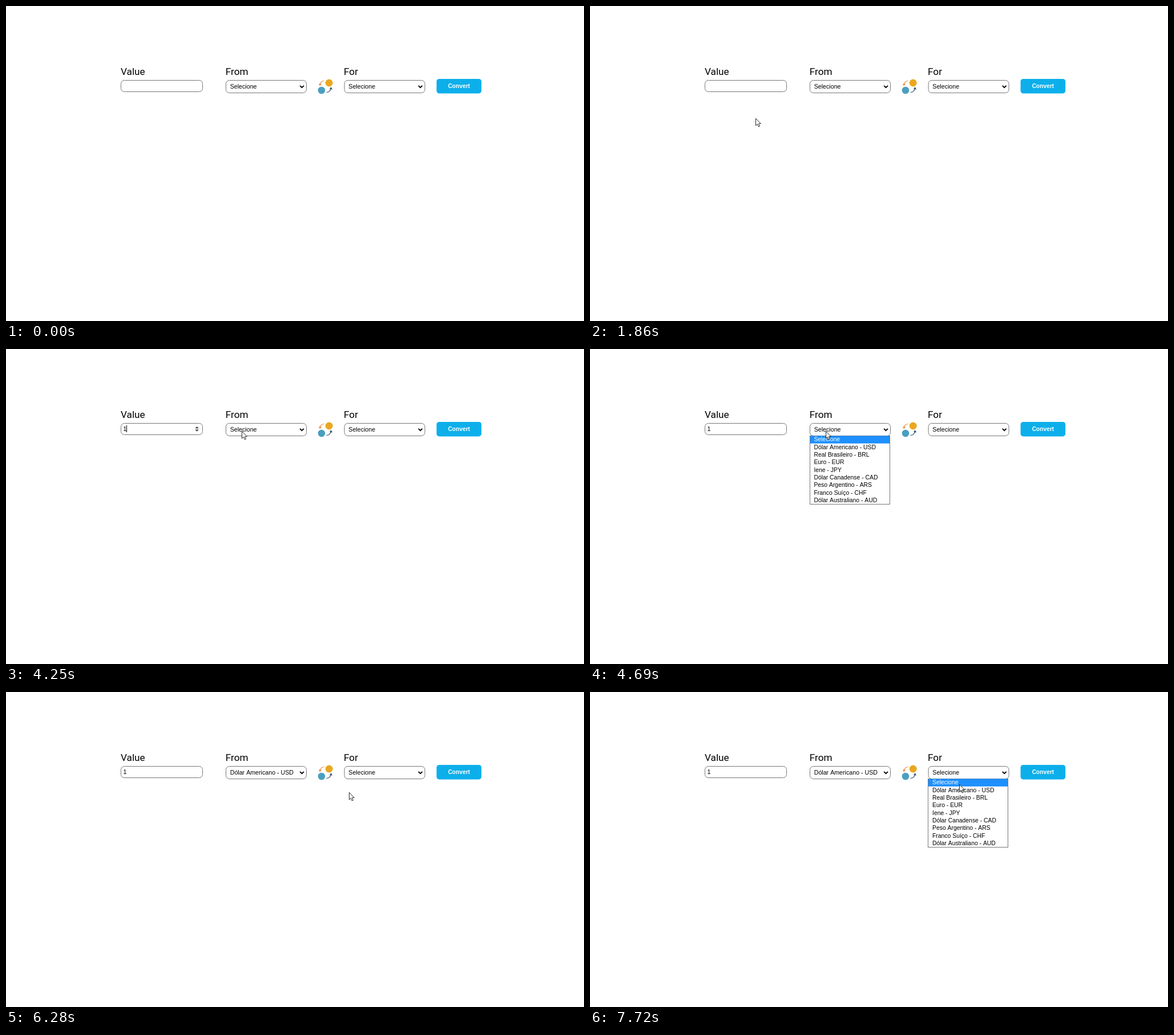
An HTML page with a canvas that plays this animation: 1013 by 553 pixels, repeating every 8 s.

```html
<!DOCTYPE html>
<html lang="en">
<head>
<meta charset="utf-8">
<title>Currency converter</title>
<style>
html, body { margin: 0; width: 100%; height: 100%; overflow: hidden; background: #fff; }
canvas { display: block; width: 1013px; height: 553px; }
</style>
</head>
<body>
<canvas id="stage"></canvas>
<script>
const W = 1013, H = 553, LOOP = 8000, TICK = 40;
const canvas = document.getElementById('stage');
const ratio = window.devicePixelRatio || 1;
canvas.width = W * ratio;
canvas.height = H * ratio;
const ctx = canvas.getContext('2d');

const ARIAL = '"Liberation Sans", Arial, sans-serif';
const LABEL = '17.2px Roboto, sans-serif';
const FIELD = `10.667px ${ARIAL}`;
const OPTION = `10.4px ${ARIAL}`;
const BUTTON = `bold 10.2px ${ARIAL}`;
const BORDER = '#767676';
const OPTIONS = [
  'Selecione', 'Dólar Americano - USD', 'Real Brasileiro - BRL',
  'Euro - EUR', 'Iene - JPY', 'Dólar Canadense - CAD',
  'Peso Argentino - ARS', 'Franco Suíço - CHF', 'Dólar Australiano - AUD'
];
const FROM_X = 385, FOR_X = 592.6;

// Pointer moves: start, last step, destination x and y
const MOVES = [
  [660, 780, 851, 474],
  [940, 1100, 620, 383],
  [1260, 1380, 452, 286],
  [1540, 1700, 291, 198],
  [1860, 2180, 236, 142],
  [3730, 3930, 362, 150],
  [4130, 4250, 413, 144],
  [5040, 5360, 418, 166],
  [5400, 5480, 417, 169],
  [5760, 5760, 417, 164],
  [5920, 5960, 417, 170],
  [6120, 6280, 601, 176],
  [6480, 6720, 654, 146],
  [6760, 6920, 645, 139],
  [7520, 7720, 647, 162]
];

const within = (t, a, b) => t >= a && t < b;
const smooth = p => p * p * (3 - 2 * p);

function pointerAt(t) {
  let x = 982, y = 533;
  for (const [start, end, toX, toY] of MOVES) {
    if (t < start) break;
    const last = Math.round((end - start) / TICK);
    const step = Math.min(last, Math.floor((t - start) / TICK));
    const p = smooth((step + 0.5) / (last + 0.5));
    x += (toX - x) * p;
    y += (toY - y) * p;
  }
  return [Math.round(x), Math.round(y)];
}

function text(str, x, y, font, color = '#000', align = 'left') {
  ctx.font = font;
  ctx.fillStyle = color;
  ctx.textAlign = align;
  ctx.fillText(str, x, y);
}

function roundBox(x, y, w, h, r, fill, stroke) {
  ctx.beginPath();
  ctx.roundRect(x, y, w, h, r);
  ctx.fillStyle = fill;
  ctx.fill();
  if (!stroke) return;
  ctx.lineWidth = 1;
  ctx.strokeStyle = stroke;
  ctx.stroke();
}

function line(points, color, width) {
  ctx.beginPath();
  points.forEach(([x, y]) => ctx.lineTo(x, y));
  ctx.strokeStyle = color;
  ctx.lineWidth = width;
  ctx.stroke();
}

function shape(points, fill) {
  ctx.beginPath();
  points.forEach(([x, y]) => ctx.lineTo(x, y));
  ctx.closePath();
  ctx.fillStyle = fill;
  ctx.fill();
}

function disc(x, y, r, color) {
  ctx.beginPath();
  ctx.arc(x, y, r, 0, Math.PI * 2);
  ctx.fillStyle = color;
  ctx.fill();
}

function curve(x0, y0, cx, cy, x1, y1, color) {
  ctx.beginPath();
  ctx.moveTo(x0, y0);
  ctx.quadraticCurveTo(cx, cy, x1, y1);
  ctx.strokeStyle = color;
  ctx.lineWidth = 1.2;
  ctx.stroke();
}

function select(x, value) {
  roundBox(x + 0.5, 130.5, 141, 22, 6, '#fff', BORDER);
  text(value, x + 7.7, 145, FIELD);
  const cx = x + 133.6;
  line([[cx - 3.4, 139.8], [cx, 143.2], [cx + 3.4, 139.8]], '#000', 1.9);
}

function swapIcon() {
  disc(566.2, 135, 6.5, '#e9a820');
  disc(553, 148, 6.3, '#4a9fc0');
  curve(557.5, 131.5, 551, 132, 550.5, 138, '#e58a3a');
  shape([[548, 136.3], [553, 136.8], [550.2, 140.6]], '#e58a3a');
  curve(561.5, 151.5, 568.5, 151, 569.3, 145, '#34506e');
  shape([[567, 146], [572, 146.4], [569.8, 142]], '#34506e');
}

function valueField(t) {
  roundBox(201.5, 130.5, 143, 20, 6, '#fff', BORDER);
  if (t >= 3340) text('1', 205.6, 144.2, FIELD);
  if (within(t, 2060, 4530)) {
    ctx.fillStyle = '#f1f1f1';
    ctx.fillRect(331, 136, 7, 9);
    shape([[331.6, 139.2], [334.6, 136], [337.6, 139.2]], '#404040');
    shape([[331.6, 141.5], [334.6, 144.7], [337.6, 141.5]], '#404040');
  }
  ctx.fillStyle = '#000';
  if (within(t, 2420, 2940)) ctx.fillRect(205, 134, 1, 12);
  if (within(t, 3340, 3730) || within(t, 4130, 4530)) ctx.fillRect(211, 134, 1, 12);
}

function dropdown(x, active, alpha) {
  ctx.globalAlpha = alpha;
  ctx.fillStyle = '#fff';
  ctx.fillRect(x, 152, 141, 121);
  ctx.strokeStyle = BORDER;
  ctx.lineWidth = 1;
  ctx.strokeRect(Math.floor(x) + 0.5, 152.5, 140, 120);
  ctx.fillStyle = '#1e90ff';
  ctx.fillRect(Math.floor(x) + 1, 152.5 + active * 13.3, 139, 13.3);
  OPTIONS.forEach((name, i) =>
    text(name, x + 7.4, 162.4 + i * 13.3, OPTION, i === active ? '#fff' : '#000'));
  ctx.globalAlpha = 1;
}

function fade(t, start, end) {
  const step = Math.floor((t - start) / TICK) + 1;
  return Math.min(1, step / ((end - start) / TICK + 1));
}

function arrowPointer(x, y) {
  ctx.save();
  ctx.translate(x + 0.5, y + 0.5);
  shape([[0, 0], [0, 12.5], [2.9, 9.9], [4.9, 14.5], [7, 13.5], [5, 9.2], [8.8, 9]], '#fff');
  ctx.strokeStyle = '#111';
  ctx.lineWidth = 0.9;
  ctx.stroke();
  ctx.restore();
}

function textPointer(x, y) {
  const cx = x + 0.5;
  line([[cx, y - 5.5], [cx, y + 6.5]], '#111', 1);
  for (const edge of [y - 5.5, y + 6.5]) {
    line([[cx - 3, edge], [cx - 0.8, edge]], '#111', 1);
    line([[cx + 0.8, edge], [cx + 3, edge]], '#111', 1);
  }
}

function draw(t) {
  ctx.setTransform(ratio, 0, 0, ratio, 0, 0);
  ctx.fillStyle = '#fff';
  ctx.fillRect(0, 0, W, H);

  text('Value', 201, 121, LABEL);
  text('From', 384.8, 121, LABEL);
  text('For', 592, 121, LABEL);
  valueField(t);
  select(FROM_X, OPTIONS[t >= 5920 ? 1 : 0]);
  select(FOR_X, OPTIONS[0]);
  swapIcon();
  roundBox(754.6, 128, 78.6, 25.4, 4.5, '#0dafeb');
  text('Convert', 794, 144, BUTTON, '#fff', 'center');

  if (within(t, 4530, 5960)) {
    const alpha = t < 5920 ? fade(t, 4530, 4690) : 0.4;
    dropdown(FROM_X, t >= 5400 ? 1 : 0, alpha);
  }
  if (t >= 7120) dropdown(FOR_X, 0, fade(t, 7120, 7240));

  if (t < 190) return;
  const [x, y] = pointerAt(t);
  const overField = x > 201 && x < 345 && y > 130 && y < 151;
  (overField ? textPointer : arrowPointer)(x, y);
}

function frame() {
  draw(performance.now() % LOOP);
  requestAnimationFrame(frame);
}
frame();
</script>
</body>
</html>
```
